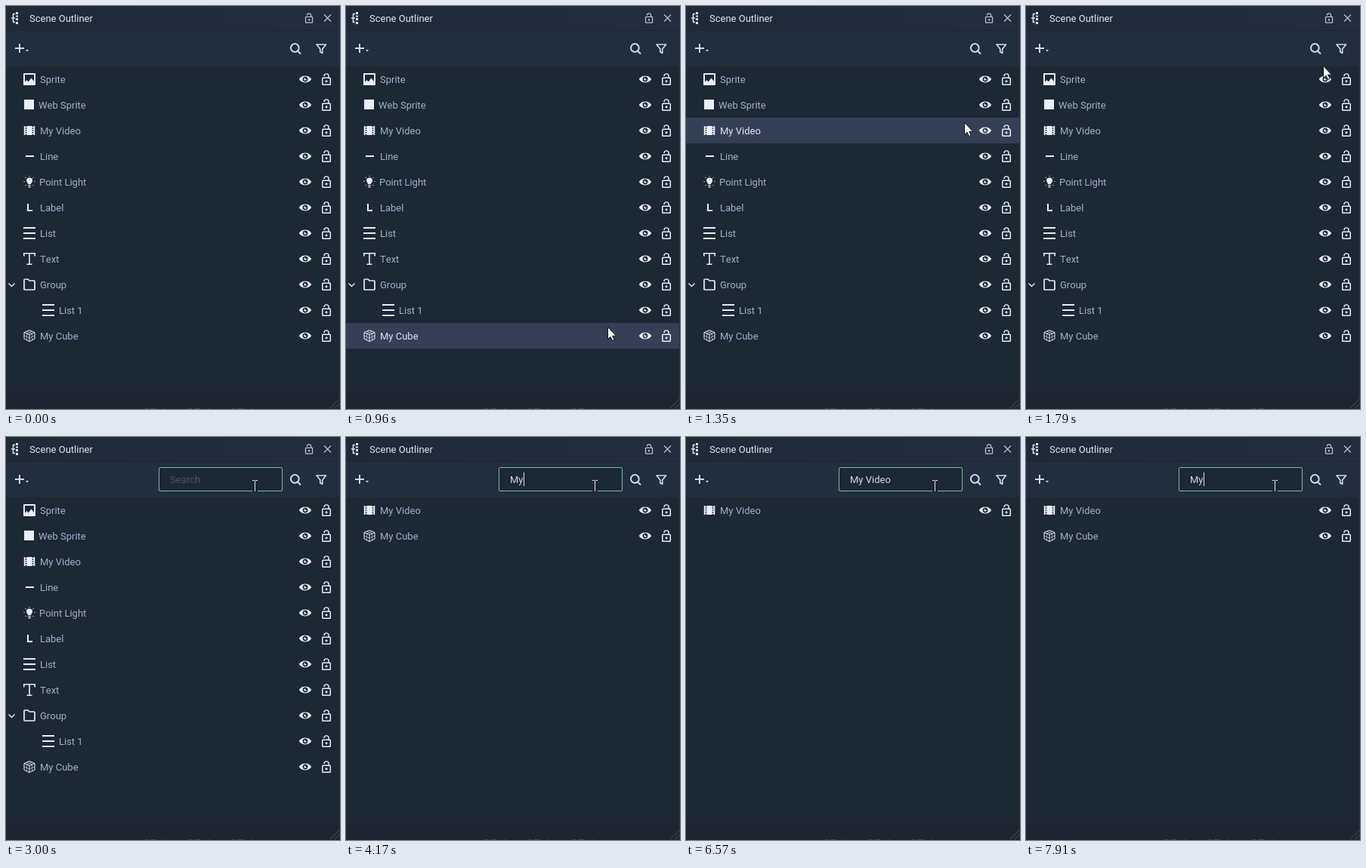
Recreate the animation shown at these times as an HTML page. Size 442 px wide and 534 px high, loop 8000 ms.

```html
<!DOCTYPE html>
<html lang="en">
<head>
<meta charset="utf-8">
<title>Scene Outliner</title>
<style>
  html, body { margin: 0; width: 100%; height: 100%; overflow: hidden; background: #1d2835; }
  svg { display: block; width: 442px; height: 534px; }
  text { font: 13px Roboto, "Open Sans", sans-serif; font-kerning: none; white-space: pre; }
  .label { fill: #a1aec8; }
  .hover .label { fill: #dfe4f0; }
  .band { fill: #353f56; visibility: hidden; }
  .hover .band { visibility: visible; }
  .icon { fill: none; stroke: #e9edf5; stroke-width: 2; }
  .solid { fill: #e9edf5; stroke: none; }
  .tool { fill: none; stroke: #c8daf3; stroke-width: 2; }
</style>
</head>
<body>
<svg id="stage" viewBox="0 0 442 534">
  <defs>
    <linearGradient id="bar"><stop stop-color="#1f2a39"/><stop offset="1" stop-color="#222d3d"/></linearGradient>
    <!-- icons are centred on 0,0 -->
    <g id="sprite"><path class="solid" fill-rule="evenodd" d="M-7-8H7Q8-8 8-7V7Q8 8 7 8H-7Q-8 8-8 7V-7Q-8-8-7-8ZM-6-6V3.5L-3.5 1L-1.5 3.5L2.5-1.5L6 3V-6Z"/></g>
    <g id="web"><rect class="solid" x="-7" y="-7" width="13" height="13"/></g>
    <g id="video"><path class="solid" transform="scale(.9 .68) translate(-12 -12)" d="M18 3v2h-2V3H8v2H6V3H4v18h2v-2h2v2h8v-2h2v2h2V3zM8 17H6v-2h2zm0-4H6v-2h2zm0-4H6V7h2zm10 8h-2v-2h2zm0-4h-2v-2h2zm0-4h-2V7h2z"/></g>
    <g id="line"><path d="M-5 0H6"/></g>
    <g id="light">
      <path class="solid" d="M-2 3C-2 1.5-4-.5-4-1.500A4 4 0 0 1 4-1.500C4 0 2 1.500 2 3ZM-2 4H2V5H-2ZM-2 6H2L1 7.500H-1Z"/>
      <circle cy="-.5" r="7" stroke-width="1.200" pathLength="40" stroke-dasharray="1 4" stroke-dashoffset=".5"/>
    </g>
    <g id="label"><path d="M-2-5V4H4"/></g>
    <g id="list"><path d="M-8-7H8M-8 0H8M-8 7H8"/></g>
    <g id="type"><path stroke-width="1.6" d="M-7.200-3.500V-7.200H7.200V-3.500M0-7V7.200M-3.500 7.200H3.500"/></g>
    <g id="folder"><path stroke-width="1.700" stroke-linejoin="round" d="M-6-7H-2L0-5H6Q7-5 7-4V6Q7 7 6 7H-6Q-7 7-7 6V-6Q-7-7-6-7Z"/></g>
    <g id="cube" stroke-linejoin="round">
      <path stroke-width="1" d="M0-7.500L7-4.500V4L0 7.500L-7 4V-4.500ZM-7-4.500L0-1.500L7-4.500M0-1.500V7.500"/>
      <path stroke-width=".6" d="M-3.500-6L3.500-3V5.800M3.500-6L-3.500-3V5.800M-7-.2L0 3L7-.2"/>
    </g>
    <g id="eye"><path class="solid" transform="scale(.8) translate(-10 -10)" d="M10 4.400C3.400 4.400 0 9.200 0 10s3.400 5.600 10 5.600S20 10.800 20 10s-3.400-5.600-10-5.600zm0 9.900c-2.500 0-4.400-1.900-4.400-4.300S7.500 5.700 10 5.700s4.400 1.900 4.400 4.300-1.900 4.300-4.400 4.300zM10 10c-.4-.4.700-2.200 0-2.200a2.200 2.200 0 1 0 2.200 2.200c0-.5-1.900.4-2.200 0z"/></g>
    <path id="lock" transform="scale(.75) translate(-12 -11.500)" d="M12 17a2 2 0 1 0 0-4 2 2 0 0 0 0 4zM18 8h-1V6A5 5 0 0 0 7 6H8.900A3.100 3.100 0 0 1 15.100 6V8H6A2 2 0 0 0 4 10V20A2 2 0 0 0 6 22H18A2 2 0 0 0 20 20V10A2 2 0 0 0 18 8zM18 20H6V10H18z"/>
    <path id="arrow" d="M-.5.5V16.500L3 13.200L5.500 18.500L8 17.400L5.700 12.200H10.500Z" fill="#fff" stroke="#10151c" stroke-linejoin="round"/>
    <g id="beam">
      <path d="M-3 7.500H4" stroke="#1d2835" stroke-width="2"/>
      <path d="M-3-6.500H0M1-6.500H4M.5-6V8" stroke="#e3e7ee" fill="none"/>
    </g>
  </defs>

  <rect width="442" height="534" fill="#1d2835"/>
  <rect width="442" height="33" fill="url(#bar)"/>
  <rect y="33" width="442" height="47" fill="#222d3d"/>
  <path d="M0 32.500H442" stroke="#1c2532"/>
  <rect y="511" width="442" height="23" fill="#1e2530"/>

  <g fill="#dfe5f0">
    <path d="M13 8h3v3h-3zM13 12.500h3v2h-3zM13 16h3v3h-3zM13 21h3v3h-3z"/>
    <path d="M12 10.500H9.500V21.500H12M7 16H12" fill="none" stroke="#dfe5f0" stroke-width="1.500"/>
    <text x="31" y="21">Scene Outliner</text>
  </g>
  <use href="#lock" transform="translate(401 16) scale(.86)" fill="#b6bfce"/>
  <path d="M421 11.500L430 20.500M430 11.500L421 20.500" stroke="#b6bfce" stroke-width="1.300"/>
  <g class="tool">
    <path d="M12 56H24M18 50V62"/>
    <path d="M26 58H30L28 60.500Z" fill="#c8daf3" stroke="none"/>
    <circle cx="382.300" cy="55.500" r="5.400"/>
    <path d="M386 59.500L390 63.500"/>
    <path stroke-width="1.700" stroke-linejoin="round" d="M411 51H423.500L418.700 57V62.500L415.800 61V57Z"/>
  </g>

  <g id="rows"></g>

  <path d="M429 533L441 521M435 533L441 527" stroke="#46505e"/>
  <path d="M183 533.500H352" stroke="#39424f" stroke-dasharray="5 3 8 10 2 30"/>
  <path d="M441.500 0V534" stroke="#2b3039"/>

  <g id="search">
    <rect x="202.500" y="40.500" width="163" height="31" rx="1.500" fill="#1d2835" stroke="#66c2a3"/>
    <text id="hint" x="217" y="61" fill="#4b565f">Search</text>
    <text id="query" x="217" y="61" fill="#d3dae6"></text>
    <rect id="caret" y="47" width="1" height="18" fill="#dde3ec"/>
  </g>
  <use id="pointer"/>
</svg>
<script>
const LOOP = 8000, TOP = 80, ROW = 34;
const $ = id => document.getElementById(id);

// label, icon, text x, indent
const items = [
  ['Sprite', 'sprite'], ['Web Sprite', 'web', 43], ['My Video', 'video'], ['Line', 'line'],
  ['Point Light', 'light', 44], ['Label', 'label'], ['List', 'list'], ['Text', 'type'],
  ['Group', 'folder'], ['List 1', 'list', 45, 25], ['My Cube', 'cube']
];

$('rows').innerHTML = items.map(([name, icon, x = 45, indent = 0]) => `<g>
  <rect class="band" width="441" height="${ROW}"/>
  <g class="icon">
    ${name === 'Group' ? '<path stroke-width="1.300" d="M3.500 15.500L7.500 19.500L11.500 15.500"/>' : ''}
    <use href="#${icon}" x="${31 + indent}" y="17"/>
    <use href="#eye" x="396" y="17"/>
    <use class="solid" href="#lock" x="424" y="17"/>
  </g>
  <text class="label" x="${x + indent}" y="22">${name}</text></g>`).join('');
const rows = [...$('rows').children];

// pointer: bursts of movement (from, to) along a path of time, x, y
const STEP = 60;
const bursts = [[300, 1020], [1110, 1910], [1990, 2140], [2330, 2330], [2670, 3000]];
const path = [[300, 318, 524], [960, 347, 425], [1350, 369, 154], [1770, 394, 79],
  [1910, 398, 58], [2330, 397, 48], [2670, 386, 46], [3000, 329, 64]];

// typed in full, then deleted again, one character per key
const PHRASE = 'My Video';
const keys = [3860, 4170, 4800, 5290, 5510, 5590, 5780, 5920, 6980, 7250, 7370, 7560, 7730, 7910];
const SEARCH_OPEN = 2520, FOCUS = 2470, BLINK = 530;

function pointerAt(time) {
  const burst = bursts.findLast(b => b[0] <= time);
  if (!burst) return null;
  const [from, to] = burst;
  const t = time >= to ? to : from + Math.floor((time - from) / STEP) * STEP;
  const i = path.findLastIndex(p => p[0] <= t);
  const [t0, x0, y0] = path[i], [t1, x1, y1] = path[i + 1] || path[i];
  const k = t1 > t0 ? (t - t0) / (t1 - t0) : 0;
  return [Math.round(x0 + (x1 - x0) * k), Math.round(y0 + (y1 - y0) * k)];
}

const show = (el, on) => el.setAttribute('visibility', on ? 'inherit' : 'hidden');

function render(t) {
  const pressed = keys.filter(k => k <= t).length;
  const length = Math.min(pressed, 2 * PHRASE.length - pressed);
  const query = PHRASE.slice(0, length);
  const open = t >= SEARCH_OPEN;
  const at = pointerAt(t);
  const hovered = at ? Math.floor((at[1] - TOP) / ROW) : -1;

  let slot = 0;
  rows.forEach((row, i) => {
    const match = items[i][0].toLowerCase().includes(query.toLowerCase());
    row.style.display = match ? '' : 'none';
    if (!match) return;
    row.setAttribute('transform', `translate(0 ${TOP + ROW * slot})`);
    row.classList.toggle('hover', slot === hovered);
    slot++;
  });

  show($('search'), open);
  show($('hint'), !length);
  $('query').textContent = query;
  $('caret').setAttribute('x', 217 + Math.round($('query').getComputedTextLength()));
  const idle = t - (pressed ? keys[pressed - 1] : FOCUS);
  show($('caret'), open && Math.floor(idle / BLINK) % 2 === 0);

  show($('pointer'), at);
  if (at) {
    $('pointer').setAttribute('href', open && at[0] < 366 ? '#beam' : '#arrow');
    $('pointer').setAttribute('transform', `translate(${at})`);
  }
}

const start = performance.now();
function tick() {
  render((performance.now() - start) % LOOP);
  requestAnimationFrame(tick);
}
tick();
</script>
</body>
</html>
```
